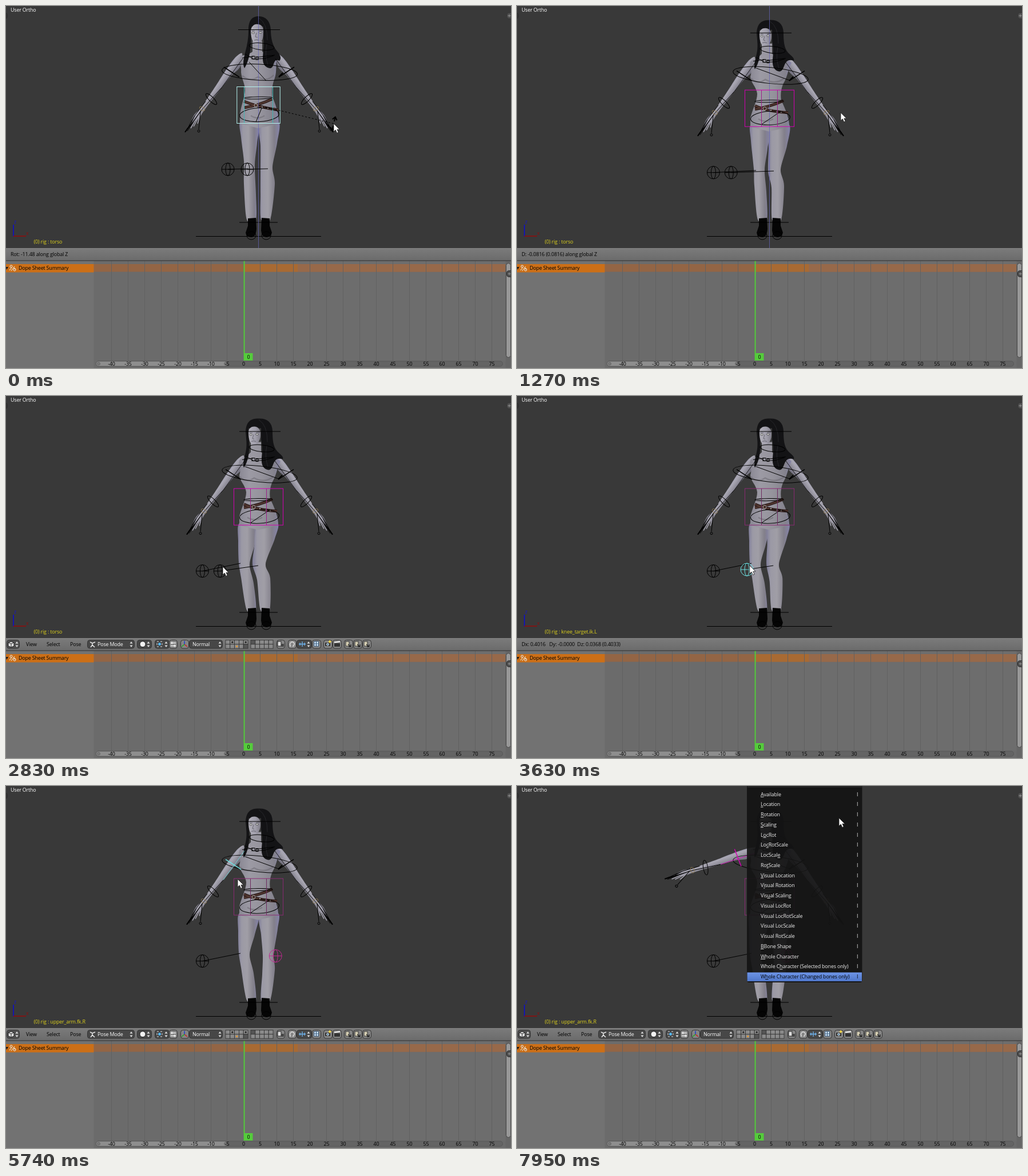
An HTML page for the animation above (7.99 s loop, 883x634 px).

```html
<!DOCTYPE html>
<html lang="en">
<head>
<meta charset="utf-8">
<title>Posing a rig</title>
<style>
html, body { margin: 0; width: 100%; height: 100%; overflow: hidden; background: #393939; }
svg { display: block; width: 100%; height: 100%; }
text { font: 8.9px "Open Sans", "Noto Sans", sans-serif; letter-spacing: -.15px; }
</style>
</head>
<body>
<svg id="stage" viewBox="0 0 883 634" preserveAspectRatio="none"></svg>
<script>
const LOOP = 7990, UNIT = 69.85, DROP = 20.6;
const TEAL = '#6fe3e3', PINK = '#d400b4';

// Drawing helpers
const path = (d, fill = 'none', stroke = 'none', w = 1, more = '') =>
  `<path d="${d}" fill="${fill}" stroke="${stroke}" stroke-width="${w}" ${more}/>`;
const line = (d, stroke = '#000', w = 1, more = '') => path(d, 'none', stroke, w, more);
const rect = (x, y, w, h, fill, more = '') =>
  `<rect x="${x}" y="${y}" width="${w}" height="${h}" fill="${fill}" ${more}/>`;
const ring = (x, y, rx, ry, turn = 0, stroke = '#000', fill = 'none') =>
  `<ellipse cx="${x}" cy="${y}" rx="${rx}" ry="${ry}" fill="${fill}" stroke="${stroke}" transform="rotate(${turn} ${x} ${y})"/>`;
const text = (x, y, s, fill = '#000', more = '') => `<text x="${x}" y="${y}" fill="${fill}" ${more}>${s}</text>`;
const group = (move, s) => `<g transform="${move}">${s}</g>`;

// Interpolation helpers
const lerp = (a, b, k) => a + (b - a) * k;
const clamp = k => Math.max(0, Math.min(1, k));
const ease = k => k * k * (3 - 2 * k);
const mixList = (a, b, k) => a.map((v, i) => lerp(v, b[i], k));
const NUM = /-?\d+(\.\d+)?/g;
function mixPath(a, b, k) {
  const to = b.match(NUM);
  let i = 0;
  return a.replace(NUM, n => lerp(+n, +to[i++], k).toFixed(2));
}
function keyed(t, keys, curve = k => k) {
  if (t <= keys[0][0]) return keys[0].slice(1);
  for (let i = 1; i < keys.length; i++) {
    const a = keys[i - 1], b = keys[i];
    if (t < b[0]) return mixList(a, b, curve((t - a[0]) / (b[0] - a[0]))).slice(1);
  }
  return keys[keys.length - 1].slice(1);
}
function poseAt(list, s) {
  const i = Math.min(Math.floor(s), list.length - 2);
  return mixList(list[i], list[i + 1], clamp(s - i));
}
function blob(p) {
  const n = p.length / 2, at = i => [p[(i + n) % n * 2], p[(i + n) % n * 2 + 1]];
  let d = `M${at(0)}`;
  for (let i = 0; i < n; i++) {
    const [a, b, c, e] = [at(i - 1), at(i), at(i + 1), at(i + 2)];
    const t = .14;
    d += `C${b[0] + (c[0] - a[0]) * t} ${b[1] + (c[1] - a[1]) * t} ${c[0] - (e[0] - b[0]) * t} ${c[1] - (e[1] - b[1]) * t} ${c}`;
  }
  return d + 'Z';
}

// Figure: shapes facing forward, then turned
const HAIR = [
  'M424 42C424 24 431 18 442 18C455 18 462 27 463 42C463 56 466 70 474 79C480 86 482 92 478 96C466 90 470 109 462 109C454 108 449 103 449 92C449 80 452 70 450 56L450 36L429 36L428 62C428 80 424 98 417 109C413 102 416 90 418 82C422 68 424 56 424 42Z',
  'M419 42C420 24 428 19 441 19C456 18 465 25 466 40C466 56 467 68 474 76C480 82 486 86 484 90C464 84 470 108 459 109C450 108 446 100 447 88C448 78 449 68 446 56L446 36L424 36L425 62C426 80 423 94 416 105C413 100 417 88 419 78C422 66 420 54 419 42Z'];
const FACE = [
  'M428 43C429 36 434 31 440 32C448 32 451 39 450 48C450 60 444 68 440 68C433 68 428 58 428 43Z',
  'M424 43C424 36 429 33 434 33C441 33 446 39 445 48C445 58 438 66 434 66C427 65 424 56 424 43Z'];
const BROWS = [
  'M429 44Q432 42 435 44M442 44Q445 42 449 43M438 47L436 54L440 55M434 60Q438 58 442 60',
  'M425 44Q428 42 431 44M437 44Q440 42 444 43M433 47L431 54L434 55M429 59Q433 57 437 59'];
const TORSO = [
  'M431 62L431 80C425 85 417 85 410 88C408 98 412 108 411 116C412 128 418 136 418 148C417 160 411 175 409 190L409 206L441 214L477 206C478 195 473 175 466 160C464 148 466 136 470 126C474 114 471 104 474 90C468 85 455 85 448 80L448 62Z',
  'M428 60L428 78C422 85 415 86 408 92C406 100 412 108 408 118C408 128 419 136 420 148C420 160 412 175 408 190L408 206L441 214L476 206C477 195 470 175 462 160C460 148 462 136 468 126C474 114 474 104 480 94C472 85 455 84 446 78L446 60Z'];
const SHADE = [
  'M413 122Q427 134 441 124Q456 134 468 121M428 192Q440 200 452 192',
  'M409 121Q420 133 434 123Q452 133 467 121M422 192Q434 200 448 192'];
const BELT = [
  'M417 178Q442 174 465 163M416 167Q440 177 476 182',
  'M416 175Q442 171 466 160M416 169Q438 179 474 181'];
const LEG_R = [
  [410, 203, 411, 230, 416, 272, 416, 312, 421, 374, 437, 374, 437, 330, 435, 278, 439, 240, 441, 206],
  [409, 208, 409, 236, 414, 285, 415, 315, 421, 374, 437, 374, 436, 325, 433, 287, 438, 250, 441, 212],
  [408, 223, 406, 255, 407, 292, 411, 318, 421, 375, 437, 375, 433, 328, 426, 295, 435, 260, 441, 226]];
const LEG_L = [
  [443, 206, 445, 245, 445, 290, 445, 330, 446, 374, 462, 374, 470, 312, 466, 282, 474, 240, 477, 203],
  [441, 212, 440, 250, 439, 290, 445, 318, 446, 374, 462, 374, 467, 315, 461, 286, 472, 245, 476, 208],
  [440, 226, 434, 265, 431, 295, 439, 322, 445, 375, 461, 375, 462, 319, 454, 294, 470, 250, 475, 223],
  [443, 226, 446, 260, 449, 297, 448, 330, 446, 375, 462, 375, 470, 322, 468, 295, 475, 250, 476, 223]];
const KNEE_R = [[424, 285], [418, 288], [410, 293]];
const KNEE_L = [[458, 285], [449, 289], [441, 297], [466, 297]];
const ARM = blob([416, 84, 404, 91, 387, 114, 371, 139, 355, 163, 344, 179, 332, 192, 327, 205, 339, 199, 348, 186, 359, 171, 377, 148, 397, 123, 412, 108]);

const armSkin = path(ARM, 'url(#arm)')
  + line('M337 192L321 214M339 193L326 215M341 193L331 212M343 190L338 207', '#a09eaa', 1.6);
function armRig(color) {
  return line('M417 93L380 144', color, 1, 'opacity=".8"')
    + line('M384 108L411 125.5', color, 1.5)
    + line('M380 144L346 182L316 222M352 168L333 193L318 219M344 184L320 220M333 193L324 212M343 186L340 217')
    + line('M316 222L326 208', '#000', 2)
    + ring(340, 220, 2, 2) + ring(362, 164, 13, 4, 45) + ring(346, 181, 5, 3, 35, '#8d7a55');
}
const globe = (x, y, c) => ring(x, y, 11, 11, 0, c) + ring(x, y, 4, 11, 0, c) + line(`M${x - 11} ${y}h22`, c);
const boots = path('M423 372L437 371L438 390Q437 405 429 405Q420 405 419 397L423 385Z', '#050505')
  + path('M447 371L461 372L461 385L465 397Q463 405 455 405Q447 405 446 393Z', '#050505')
  + line('M408 379H475M332 403.5H551') + ring(429, 402, 8, 7) + ring(455, 402, 8, 7);

function upperBody(r, armTurn) {
  const m = pair => mixPath(pair[0], pair[1], r);
  const ex = lerp(432, 428, r), belt = m(BELT), bx = lerp(437, 433, r);
  return group(`translate(${-3 * (1 - r)} ${r - 1}) rotate(${armTurn} 410 93.4)`, armSkin)
    + group(`translate(${888 - r} ${r - 1}) scale(-1 1)`, armSkin)
    + path(m(TORSO), 'url(#torso)') + line(m(SHADE), '#5c5a62', 2.5, 'opacity=".4"')
    + line(belt, '#2e1d1b', 5) + line(belt, '#553931', 2) + ring(bx, 174, 3, 3, 0, '#aaa')
    + line(`M${bx + 10} 177h2m8 2h2m6 1h2`, '#bbb', 2)
    + path(m(HAIR), '#131315') + line('M442 21Q457 30 457 60M456 66Q452 86 458 104', '#26262a')
    + path(m(FACE), 'url(#face)')
    + ring(ex, 47, 2.4, 1.3, 0, '#444', '#fff') + ring(ex + lerp(13, 11, r), 46.5, 2.4, 1.3, 0, '#444', '#fff')
    + line(m(BROWS), '#55535e', .8);
}
function upperRig(r, armTurn, armColor) {
  return line(mixPath('M406 41.5H479', 'M408 41.5H480', r))
    + ring(447, 71, 22, 6, 6) + ring(443.5, 116, 66, 14, lerp(3, 6, r))
    + line(mixPath('M425 98L455 131', 'M418 103L478 125', r))
    + line('M413 91L433 88M437 90L470 86M418 84L433 93L452 92L468 87')
    + rect(430, 88, 5, 5, 'none', 'stroke="#000"') + rect(437, 89, 4, 5, 'none', 'stroke="#000"')
    + ring(441, 161, 25, 2, -1) + ring(443, 190.5, 34.5, 12, -3)
    + line(mixPath('M437 203L447 179', 'M427 202L461 179', r))
    + group(`translate(${-3 * (1 - r)} ${r - 1}) rotate(${armTurn} 410 93.4)`, armRig(armColor))
    + group(`translate(${888 - r} ${r - 1}) scale(-1 1)`, armRig('#000') + line('M404 118L411 125', '#000', 2));
}
function torsoBox(turn, color, inner) {
  const a = turn * Math.PI / 180, out = 32 * (Math.cos(a) + Math.sin(a)), mid = 32 * (Math.cos(a) - Math.sin(a));
  return line(`M${441.5 - mid} 141.5v64M${441.5 + mid} 141.5v64`, inner)
    + rect(441.5 - out, 141.5, 2 * out, 64, 'none', `stroke="${color}"`);
}

// Interface
const ITEMS = ['Available', 'Location', 'Rotation', 'Scaling', 'LocRot', 'LocRotScale', 'LocScale', 'RotScale',
  ...['Location', 'Rotation', 'Scaling', 'LocRot', 'LocRotScale', 'LocScale', 'RotScale'].map(s => 'Visual ' + s),
  'BBone Shape', 'Whole Character', 'Whole Character (Selected bones only)', 'Whole Character (Changed bones only)'];
const HOTKEY = [0, 0, 0, 0, 1, 2, 7, 2, 0, 1, 3, -1, -1, -1, -1, 0, 0, 7, 1];
const menu = rect(402, -6, 201.5, 350, '#141414', 'rx="4" opacity=".92"') + line('M403 1.5H603', '#333')
  + rect(402.5, 326.5, 200.5, 15.5, 'url(#pick)')
  + ITEMS.map((s, i) => {
    const y = 17.7 + i * 17.75, k = HOTKEY[i], ink = i === 18 ? '#000' : '#eee';
    const label = k < 0 ? s : `${s.slice(0, k)}<tspan text-decoration="underline">${s[k]}</tspan>${s.slice(k + 1)}`;
    return text(426, y, label, ink) + text(594, y, 'I', ink);
  }).join('');

const btn = (x, w, fill = '#858585') => rect(x + .5, 427.5, w - 1, 14.5, fill, 'rx="4" stroke="#333"');
const arrows = x => path(`M${x - 2.5} 433.5l2.5 -3.5l2.5 3.5zM${x - 2.5} 436.5l2.5 3.5l2.5 -3.5z`, '#ddd');
function layers(x, on) {
  let s = '';
  for (let i = 0; i < 10; i++) {
    const cx = x + i % 5 * 7.8, cy = 427.5 + (i > 4) * 7.3;
    s += rect(cx, cy, 7.8, 7.3, i === on ? '#555' : '#8a8a8a', 'stroke="#303030" stroke-width=".8"');
    if (on && (i === 1 || i === 4 || i === 7)) s += `<circle cx="${cx + 4}" cy="${cy + 3.7}" r="1.6" fill="${i === 7 ? '#e89a30' : '#222'}"/>`;
  }
  return s;
}
const clips = [591, 607, 623].map(x => btn(x, 16) + rect(x + 3, 430, 6, 8, '#d6cfb4', 'stroke="#333"')
  + line(`M${x + 7} 435l5 4m0 -4v4h-4`, '#222', 1.3)).join('');
const buttons = btn(1, 23, '#505050') + path('M4 432l5 -2l5 2v6l-5 2l-5 -2z', '#ddd', '#222') + line('M4 432l5 2l5 -2M9 434v6', '#333') + arrows(19)
  + text(35, 438.3, 'View') + text(71, 438.3, 'Select') + text(112, 438.3, 'Pose')
  + btn(142, 83, '#474747') + line('M147 431l4 2l5 -2M151 433v3l-3 4M151 436l4 4', '#e8e8e8', 1.5) + text(160, 438.3, 'Pose Mode', '#fff') + arrows(219)
  + btn(229, 26, '#474747') + ring(239, 434.7, 5, 5, 0, '#222', '#f2f2f2') + arrows(249)
  + btn(260, 26, '#474747') + rect(264, 430, 9, 9, 'none', 'stroke="#ddd" stroke-dasharray="3 3"') + ring(268.5, 434.5, 2, 2, 0, '#5bf', '#5bf') + arrows(280)
  + btn(285, 15) + line('M288 432.5h9M288 437.5h9', '#eee', 1.5) + ring(290, 432.5, 1.5, 1.5, 0, '#eee') + ring(295, 437.5, 1.5, 1.5, 0, '#eee')
  + btn(305, 15) + line('M312 435V429', '#24c', 1.6) + line('M312 435l5 4', '#c22', 1.6) + line('M312 435l-5 4', '#2a2', 1.6)
  + btn(320, 59, '#474747') + text(326, 438.3, 'Normal', '#fff') + arrows(374)
  + layers(384, 9) + layers(428, 0)
  + btn(473, 15) + rect(475, 430, 6, 8, '#ddd', 'stroke="#222"') + rect(481, 434, 5, 5, '#444')
  + btn(493, 15) + line('M497.5 439l-1 -4q1 -5 5 -4q4 2 2 5l-2 3', '#ccc', 2)
  + btn(508, 27, '#474747') + line('M512 434.5h12M514 432v5M518 430v9M522 432v5', '#6fb4ee', 1.3) + arrows(529)
  + btn(535, 16) + rect(538.5, 430, 8, 8, '#cfe3f5', 'stroke="#357"') + line('M542.5 430v8M538.5 434h8', '#357')
  + btn(555, 16) + rect(558, 432, 9, 6, '#333') + ring(562.5, 435, 2, 2, 0, '#ddd', '#58a') + path('M566 427l1.5 2.5l2.5 .5l-2.5 1l-1.5 2.5l-1 -2.5l-2.5 -1l2.5 -.5z', '#fd4')
  + btn(571, 16) + rect(574, 433, 10, 6, '#333') + line('M574 431.5l10 -1.5', '#eee', 2)
  + clips;

const COL = 28.92, gridX = i => Math.round(415.4 + i * COL) + .5;
let dope = rect(0, 446, 883, 188, '#6b6b6b') + rect(416, 446, 458, 175, '#6d6d6d') + rect(0, 446, 153.5, 188, '#727272')
  + rect(153.5, 452, 720, 13.5, '#936545') + rect(416, 452, 94, 13.5, '#a86a33') + rect(510, 452, 363, 13.5, '#97694a');
for (let i = -8; i <= 15; i++) dope += line(`M${gridX(i)} 446V621`, '#616161');
dope += rect(0, 452, 153.5, 14.5, '#cc6f17') + path('M0 457h4l-3 5z', '#111')
  + line('M6 463l4 -5M9 464l6 -8M13 458l4 3', '#e8d8c0', 1.2) + ring(9, 456, 2, 2, 0, '#eee') + ring(15, 462, 2, 2, 0, '#eee') + text(22, 462.2, 'Dope Sheet Summary')
  + rect(157.5, 622, 711, 9, '#646464', 'rx="4.5" stroke="#585858"') + rect(157.5, 622, 229, 9, '#8e8e8e', 'rx="4.5" stroke="#585858"')
  + ring(162, 626.5, 2.5, 2.5, 0, '#666', '#777') + ring(384, 626.5, 2.5, 2.5, 0, '#666', '#777');
for (let i = -8; i <= 15; i++) dope += text(gridX(i), 630, i * 5, '#000', 'text-anchor="middle"');
dope += rect(415.5, 446, 2, 175, '#55cc3c') + rect(416, 608, 15.5, 13, '#55cc3c') + text(421.5, 618, '0')
  + rect(873.5, 446, 10, 188, '#666') + rect(874.5, 450.5, 8, 165, '#989898', 'rx="4" stroke="#444"')
  + line('M0 446H883', '#2f2f2f');
const plus = y => rect(875.5, y - 5.5, 14, 11, '#4a4a4a', 'rx="4" stroke="#333"') + line(`M877.5 ${y}h5M880 ${y - 2.5}v5`, '#999');

const stops = list => list.map(([o, c]) => `<stop offset="${o}" stop-color="${c}"/>`).join('');
const grad = (id, list, dir = '') => `<linearGradient id="${id}" ${dir}>${stops(list)}</linearGradient>`;
document.getElementById('stage').innerHTML = '<defs>'
  + grad('leg', [[0, '#7f7d99'], [.18, '#9b99a5'], [.45, '#a09ea6'], [.75, '#827f8a'], [1, '#8583aa']])
  + grad('torso', [[0, '#8a8894'], [.25, '#9c9aa4'], [.55, '#95939c'], [.85, '#84828d'], [1, '#8684a8']])
  + grad('arm', [[0, '#9c9ab0'], [.35, '#a9a7b3'], [.7, '#918f9b'], [1, '#767482']],
    'gradientUnits="userSpaceOnUse" x1="370" y1="133" x2="384" y2="143"')
  + grad('face', [[0, '#b4b2bc'], [.6, '#9e9ca8'], [1, '#7f7d88']])
  + grad('pick', [[0, '#6d94e6'], [1, '#4f77cb']], 'x2="0" y2="1"')
  + grad('bar', [[0, '#7b7b7b'], [1, '#6b6b6b']], 'x2="0" y2="1"')
  + '</defs>' + rect(0, 0, 883, 424, '#393939')
  + '<g id="figure"></g>' + line('M441.5 0V424', '#6464b4', 1, 'id="axis" opacity=".75"') + '<g id="rig"></g>'
  + text(8, 10.2, 'User Ortho', '#fff') + plus(17) + rect(-5, 12, 7, 10, '#333', 'rx="3" stroke="#2a2a2a"')
  + line('M13 403.5V383', '#0a0ad8', 1.5) + line('M13 403H35', '#960a0a', 1.5)
  + text(14, 381, 'z', '#1414d0') + text(35, 401, 'x', '#8a1010')
  + text(48.5, 415.8, '', '#ddd01c', 'id="name"') + '<g id="menu"></g>'
  + rect(0, 424, 883, 22, 'url(#bar)') + line('M0 424.5H883', '#858585')
  + `<g id="buttons">${buttons}</g>` + text(8, 438.3, '', '#000', 'id="status"')
  + dope + plus(469) + '<g id="cursor"></g>';

const el = id => document.getElementById(id);
const show = (id, on) => { el(id).style.display = on ? '' : 'none'; };
el('menu').innerHTML = menu;
el('cursor').innerHTML = path('M0 0V14L3.3 11L5.7 16.4L8.2 15.3L5.9 10.2H10.2Z', '#fff', '#1c1c1c', .8);

const CURSOR = [[70, 573, 206], [760, 566, 181], [1940, 566, 201.6], [2150, 566, 201.6], [2830, 379, 299], [3350, 379, 299],
  [4230, 476, 292], [4590, 476, 292], [5170, 397, 143], [5700, 397, 143], [5740, 405, 163], [5810, 405, 163],
  [6520, 358, 180], [6570, 358, 180], [7060, 583, 116], [7570, 583, 116], [7810, 563, 56]];

function dial(x, y, cx, cy) {
  const a = Math.atan2(cy - y, cx - x) * 180 / Math.PI;
  return line(`M${x} ${y}L${cx} ${cy}`, '#000', 1, 'stroke-dasharray="3 3"')
    + group(`translate(${cx} ${cy}) rotate(${a})`, line('M-4 -7L0 -12L4 -7M0 -12V-4M-4 7L0 12L4 7M0 12V4', '#000', 2));
}

function render(t) {
  const r = ease(clamp((t - 70) / 690)), turn = lerp(11.48, 27, r);
  const [dy] = keyed(t, [[950, 0], [1270, 5.7], [1320, 5.7], [1640, 17], [1760, 17], [1940, DROP]]);
  const [k] = keyed(t, [[3350, 0], [4130, .97], [4180, .97], [4230, 1]], ease);
  const swing = 36 * ease(clamp((t - 5810) / 710));
  const swinging = t >= 5810 && t < 6520;
  let [cx, cy] = keyed(t, CURSOR, ease);
  if (t > 760 && t < 2150) cy = 181 + dy;
  if (t >= 3350 && t < 4590) [cx, cy] = [379 + 97 * k, 299 - 7 * k];

  const d = dy / DROP, first = 5.7 / DROP;
  const s = d < first ? r * .7 + .3 * d / first : 1 + (d - first) / (1 - first);
  const sl = s + k;
  const boxColor = t < 760 ? '#b4f2ee' : t < 2950 ? PINK : '#8a2a74';
  const boxInner = t < 760 ? '#3fb5b5' : t < 2950 ? '#9c2088' : '#6d2c60';
  const kneeColor = t < 2950 ? '#000' : t < 4600 ? TEAL : t < 5480 ? PINK : '#c0288f';
  const armColor = t < 5480 ? '#000' : t < 6570 ? TEAL : PINK;

  const a = turn * Math.PI / 180, mid = 441 - 181 * Math.sin(a), off = 17.3 * Math.cos(a), by = 286 + dy;
  const lx = mid + off + 97 * k, ly = by - 9 * k;
  const kr = poseAt(KNEE_R, Math.min(s, 2)), kl = poseAt(KNEE_L, sl);

  el('figure').innerHTML = path(blob(poseAt(LEG_R, Math.min(s, 2))), 'url(#leg)')
    + path(blob(poseAt(LEG_L, sl)), 'url(#leg)') + boots
    + group(`translate(0 ${dy})`, upperBody(r, swing));
  el('rig').innerHTML = group(`translate(0 ${dy})`, upperRig(r, swing, armColor) + torsoBox(turn, boxColor, boxInner))
    + line(`M${mid - off} ${by}L${kr}`) + globe(mid - off, by, '#000')
    + (k < .9 ? line(`M${lx} ${ly}L${kl}`) : '') + globe(lx, ly, kneeColor)
    + (t < 760 ? dial(441.5, 174, cx, cy) : swinging ? dial(410, 114, cx, cy) : '');

  let status = '';
  if (t < 760) status = `Rot: ${(-turn).toFixed(2)} along global Z`;
  else if (t >= 950 && t < 2150) status = `D: ${(-dy / UNIT).toFixed(4)} (${(dy / UNIT).toFixed(4)}) along global Z`;
  else if (t >= 3350 && t < 4600) {
    status = `Dx: ${(1.3994 * k).toFixed(4)}\u00a0\u00a0 Dy: -0.0000\u00a0\u00a0Dz: ${(.1283 * k).toFixed(4)} (${(1.4053 * k).toFixed(4)})`;
  } else if (swinging) status = `Rot: ${swing.toFixed(2)}`;
  el('status').textContent = status;
  show('buttons', !status);
  show('axis', status.endsWith('Z'));
  show('menu', t >= 7950);
  el('name').textContent = '(0) rig : ' + (t < 2950 ? 'torso' : t < 5480 ? 'knee_target.ik.L' : 'upper_arm.fk.R');
  el('cursor').setAttribute('transform', `translate(${cx} ${cy})`);
}

const start = performance.now();
function tick() {
  render((performance.now() - start) % LOOP);
  requestAnimationFrame(tick);
}
tick();
</script>
</body>
</html>
```
